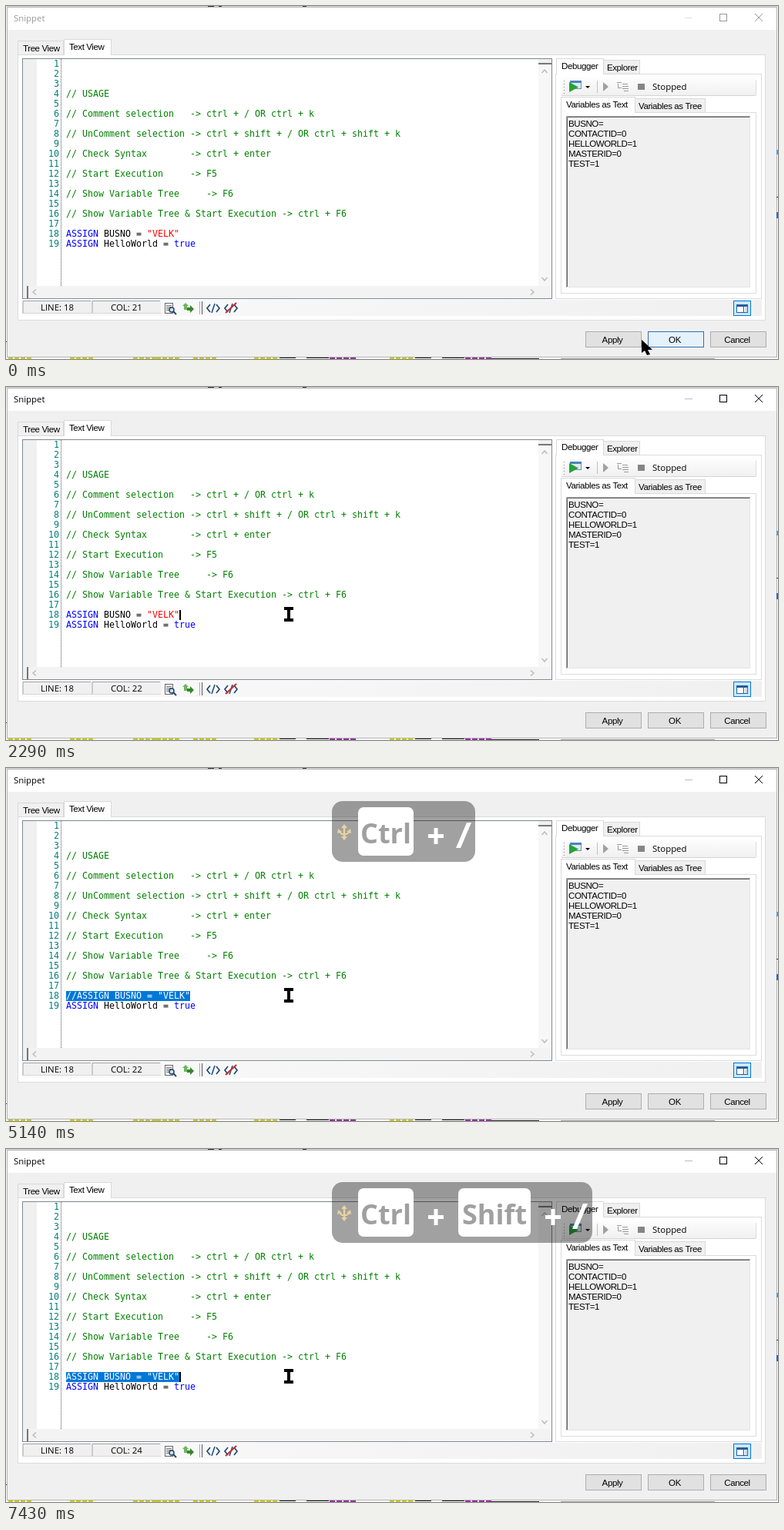
An HTML page with a canvas for the animation above (8000 ms loop, 1002 by 459 pixels).

```html
<!DOCTYPE html>
<html lang="en">
<head>
<meta charset="utf-8">
<title>Snippet editor</title>
<style>
html, body { margin: 0; width: 100%; height: 100%; overflow: hidden; background: #fff; }
canvas { display: block; }
</style>
</head>
<body>
<canvas id="stage" width="1002" height="459"></canvas>
<script>
const g = document.getElementById('stage').getContext('2d');
const LOOP = 8000;
const UI = '11.4px "Open Sans", sans-serif';
const FORM = '11.5px "Liberation Sans", sans-serif';
const CODE = '11.63px "DejaVu Sans Mono", monospace';
const KEY = 'bold 36px "Open Sans", sans-serif';
const GREEN = '#008000', BLUE = '#0000ff', RED = '#ff0000';
const NAME = '"VELK"';

// Pointer positions: time, x, y
const pointer = [
  [0, 825, 434], [140, 734, 410], [290, 624, 386], [430, 490, 349],
  [570, 408, 316], [710, 374, 295], [860, 373, 295], [1000, 361, 286]
];
const caretToggles = [1290, 1710, 2290, 2710, 3290, 4140, 4570, 5140, 5570, 6140, 6710, 7290, 7430];
const usage = {
  4: '// USAGE',
  6: '// Comment selection   -> ctrl + / OR ctrl + k',
  8: '// UnComment selection -> ctrl + shift + / OR ctrl + shift + k',
  10: '// Check Syntax        -> ctrl + enter',
  12: '// Start Execution     -> F5',
  14: '// Show Variable Tree     -> F6',
  16: '// Show Variable Tree & Start Execution -> ctrl + F6'
};

function rect(x, y, w, h, fill, border) {
  if (fill) { g.fillStyle = fill; g.fillRect(x, y, w, h); }
  if (border) {
    g.strokeStyle = border;
    g.lineWidth = 1;
    g.strokeRect(x + .5, y + .5, w - 1, h - 1);
  }
}

function text(str, x, y, font = FORM, color = '#000', align = 'left') {
  g.font = font;
  g.letterSpacing = font === FORM ? '-0.4px' : '0px';
  g.fillStyle = color;
  g.textAlign = align;
  g.fillText(str, x, y);
}

function line(points, color, width = 1) {
  g.beginPath();
  points.forEach(([x, y]) => g.lineTo(x, y));
  g.strokeStyle = color;
  g.lineWidth = width;
  g.stroke();
}

function poly(points, color) {
  g.beginPath();
  points.forEach(([x, y]) => g.lineTo(x, y));
  g.fillStyle = color;
  g.fill();
}

function round(x, y, w, h, r, color) {
  g.beginPath();
  g.roundRect(x, y, w, h, r);
  g.fillStyle = color;
  g.fill();
}

function dots(x, y, end, step, color) {
  for (; y < end; y += step) rect(x, y, 1, 1, color);
}

function gradient(x0, y0, x1, y1, from, to) {
  const fill = g.createLinearGradient(x0, y0, x1, y1);
  fill.addColorStop(0, from);
  fill.addColorStop(1, to);
  return fill;
}

function tab(label, x, y, w, h, active, baseline, inset = 7) {
  rect(x, y, w, h, active ? '#fff' : '#f0f0f0', '#d9d9d9');
  if (active) rect(x + 1, y + h - 1, w - 2, 2, '#fff');
  text(label, x + inset, baseline);
}

// dx, dy give the direction the chevron points in
function chevron(x, y, dx, dy) {
  line([
    [x - 2 * dx - 3.5 * dy, y - 3.5 * dx - 2 * dy],
    [x + 2 * dx, y + 2 * dy],
    [x - 2 * dx + 3.5 * dy, y + 3.5 * dx - 2 * dy]
  ], '#bcbcbc', 1.5);
}

function drawBackdrop() {
  rect(0, 0, 1002, 459, '#fff');
  rect(0, 0, 1002, 1, '#d8d8d8');
  [[262, 8], [276, 4], [385, 5]].forEach(([x, w]) => rect(x, 0, w, 1, '#333'));
  [3, 83, 165, 195, 243, 322, 498].forEach(x => {
    for (let i = 0; i < 32; i += 8) rect(x + i, 457, 6, 2, '#c8c81e');
  });
  [[355, 21], [390, 29], [531, 21], [566, 29]].forEach(([x, w]) => rect(x, 457, w, 1, '#111'));
  [420, 596].forEach(x => { for (let i = 0; i < 36; i += 9) rect(x + i, 457, 7, 2, '#90319a'); });
  rect(630, 458, 62, 1, '#222');
  rect(720, 458, 200, 1, '#999');
  rect(0, 436, 2, 1, '#333');
}

function drawWindow(active) {
  rect(1, 1, 1000, 456, '#f0f0f0', '#b4b4b4');
  rect(2, 2, 998, 29, '#fff');
  rect(1000, 187, 2, 6, '#4d9ddb');
  rect(1000, 268, 2, 8, '#2864c8');
  rect(1000, 248, 2, 1, '#333');
  const ink = active ? '#000' : '#999';
  text('Snippet', 10, 20, UI, ink);
  rect(881, 15, 10, 1, active ? '#bbb' : '#e0e0e0');
  rect(926, 10, 10, 10, null, ink);
  line([[972, 10], [982, 20]], ink);
  line([[982, 10], [972, 20]], ink);

  rect(15, 63, 971, 346, '#fff', '#dcdcdc');
  tab('Tree View', 15, 45, 60, 19, false, 59);
  tab('Text View', 75, 43, 62, 21, true, 57);
}

function drawEditorFrame() {
  rect(21, 68, 688, 313, '#fff', '#828790');
  rect(22, 69, 18, 295, '#f0f0f0');
  dots(71, 69, 364, 2, '#555');
  rect(691, 69, 17, 295, '#f7f7f7');
  rect(691, 69, 17, 7, '#f0f0f0');
  rect(691, 74, 17, 2, '#777');
  rect(22, 364, 686, 16, '#f3f3f3');
  rect(22, 364, 7, 16, '#f0f0f0');
  rect(27, 364, 2, 16, '#777');
  chevron(699, 85, 0, -1);
  chevron(699, 355, 0, 1);
  chevron(37, 372, -1, 0);
  chevron(683, 372, 1, 0);
  for (let n = 1; n <= 19; n++) text(n, 69, 66 + 13 * n, CODE, '#008080', 'right');
}

function drawStatusBar(col) {
  rect(21, 382, 960, 21, gradient(21, 0, 981, 0, '#fafafa', '#f0f0f0'));
  [22, 112].forEach(x => {
    rect(x, 383, 89, 17, '#f0f0f0');
    line([[x, 400], [x, 383.5], [x + 88, 383.5]], '#a0a0a0');
    rect(x, 399, 89, 1, '#d8d8d8');
  });
  text('LINE: 18', 45, 396, UI);
  text('COL: ' + col, 136, 396, UI);

  // Document with magnifier
  rect(206, 386, 11, 14, '#fff', '#666');
  for (let y = 389; y < 397; y += 2) rect(208, y, 7, 1, '#777');
  g.beginPath();
  g.arc(215, 395, 3, 0, 7);
  g.fillStyle = '#cfe3f5';
  g.fill();
  g.strokeStyle = '#25476b';
  g.lineWidth = 1.5;
  g.stroke();
  line([[217, 397], [221, 401]], '#25476b', 2);

  // Green syntax arrows
  poly([[229, 390], [233, 386], [237, 390], [235, 390], [235, 395], [231, 395], [231, 390]], '#6cb55f');
  poly([[235, 392], [239, 392], [239, 389], [244, 394], [239, 399], [239, 396], [235, 396]], '#36862b');

  rect(251, 384, 1, 17, '#aaa');
  rect(254, 384, 1, 17, '#555');
  [261, 284].forEach(x => {
    line([[x + 4, 388], [x, 393], [x + 4, 398]], '#1d4a74', 1.7);
    line([[x + 12, 388], [x + 16, 393], [x + 12, 398]], '#1d4a74', 1.7);
    line([[x + 10, 387], [x + 6, 399]], '#1d4a74', 1.5);
  });
  line([[285, 399], [299, 386]], '#c92d2d', 2);

  rect(944, 383, 23, 20, '#cce8ff', '#0078d7');
  rect(948, 388, 15, 11, '#fff', '#245d9b');
  rect(948, 388, 15, 3, '#245d9b');
  rect(957, 390, 1, 8, '#245d9b');
  dots(960, 392, 398, 2, '#245d9b');
}

function drawDebugger() {
  rect(713, 88, 268, 293, '#fff', '#dcdcdc');
  tab('Explorer', 775, 70, 48, 19, false, 84, 5);
  tab('Debugger', 714, 68, 62, 21, true, 82);

  rect(721, 93, 252, 24, gradient(0, 93, 0, 117, '#fdfdfd', '#f0f0f0'));
  rect(721, 116, 252, 1, '#d5d5d5');
  rect(973, 96, 1, 20, '#ddd');
  dots(724, 97, 114, 4, '#888');
  rect(732, 97, 15, 11, '#dfe9f2', '#7590a8');
  rect(732, 97, 15, 3, '#4b83b8');
  poly([[731, 99], [743, 105.5], [731, 112]], '#26a234');
  poly([[752, 104], [758, 104], [755, 107]], '#000');
  rect(767, 97, 1, 16, '#c0c0c0');
  poly([[775, 99], [782, 105], [775, 111]], '#a0a0a0');
  [[793, 99, 6], [800, 101, 7], [800, 104, 8], [800, 107, 8], [802, 110, 6]].forEach(([x, y, w]) => rect(x, y, w, 1, '#999'));
  line([[794.5, 101], [794.5, 106.5], [799, 106.5]], '#999');
  rect(820, 101, 9, 8, '#858585');
  text('Stopped', 839, 109, UI);

  rect(720, 138, 254, 236, '#fff', '#dcdcdc');
  tab('Variables as Tree', 816, 120, 92, 19, false, 134, 5);
  tab('Variables as Text', 720, 118, 97, 21, true, 132);

  // Sunken text box
  rect(727, 143, 239, 223, '#f0f0f0');
  line([[727.5, 366], [727.5, 143.5], [966, 143.5]], '#a0a0a0');
  line([[728.5, 365], [728.5, 144.5], [965, 144.5]], '#696969');
  line([[728, 365.5], [965.5, 365.5], [965.5, 144]], '#e3e3e3');
  ['BUSNO=', 'CONTACTID=0', 'HELLOWORLD=1', 'MASTERID=0', 'TEST=1']
    .forEach((s, i) => text(s, 730, 157 + 13 * i));
}

function button(label, x, hot) {
  rect(x, 423, 73, 21, hot ? '#e5f1fb' : '#e1e1e1', hot ? '#2f6fb3' : '#adadad');
  text(label, x + 35, 438, FORM, '#000', 'center');
}

function codeRun(parts, n) {
  let x = 78;
  parts.forEach(([s, color]) => {
    text(s, x, 66 + 13 * n, CODE, color);
    x += s.length * 7;
  });
}

function drawCode(t) {
  for (const n in usage) codeRun([[usage[n], GREEN]], +n);
  const commented = t >= 3570 && t < 7430;
  const statement = (commented ? '//' : '') + 'ASSIGN BUSNO = ' + NAME;
  const end = 78 + statement.length * 7;
  if (t >= 3570) {
    rect(78, 290, end - 78, 13, '#0078d7');
    codeRun([[statement, '#fff']], 18);
  } else {
    codeRun([['ASSIGN', BLUE], [' BUSNO = ', '#000'], [NAME, RED]], 18);
  }
  codeRun([['ASSIGN', BLUE], [' HelloWorld = ', '#000'], ['true', BLUE]], 19);
  if (caretToggles.filter(at => at <= t).length % 2) rect(end, 290, 2, 13, '#000');
}

function drawHandle() {
  const color = '#ead2a2';
  line([[439, 76], [439, 91]], color, 2.5);
  line([[433, 83], [436, 86], [442, 86], [446, 83]], color, 2);
  poly([[435, 78], [439, 73], [443, 78]], color);
  poly([[430, 85], [431, 79], [436, 83]], color);
  poly([[448, 85], [447, 79], [442, 83]], color);
  poly([[435, 89], [443, 89], [439, 94]], color);
}

function keyCap(label, x, w) {
  round(x, 51, w, 63, 7, '#fff');
  text(label, x + w / 2, 98, KEY, '#a0a0a0', 'center');
}

function plus(x) {
  rect(x - 10, 86, 20, 5, '#fff');
  rect(x - 2.5, 78, 5, 21, '#fff');
}

function slash(x) {
  poly([[x + 14, 71], [x + 20, 71], [x + 6, 104], [x, 104]], '#fff');
}

function drawKeys(t) {
  const first = t >= 3570 && t < 6570;
  const second = t >= 7430;
  if (first || second) {
    round(423, 43, first ? 186 : 338, 79, 14, 'rgba(0,0,0,.37)');
    keyCap('Ctrl', 457, 72);
    plus(558);
    if (second) {
      keyCap('Shift', 587, 94);
      plus(710);
    }
    slash(first ? 584 : 735);
  }
  if (second || t >= 3570 && t < 6710) drawHandle();
}

function drawPointer(t) {
  const [at, x, y] = pointer.findLast(p => p[0] <= t);
  if (at < 430) {
    poly([[0, 0], [0, 17], [4, 14], [7, 20], [11, 19], [8, 13], [14, 13]].map(([a, b]) => [x + a, y + b]), '#000');
  } else {
    rect(x, y, 12, 4, '#000');
    rect(x + 4, y, 4, 19, '#000');
    rect(x, y + 15, 12, 4, '#000');
  }
}

function draw(now) {
  const t = now % LOOP;
  drawBackdrop();
  drawWindow(t >= 1140);
  drawEditorFrame();
  drawDebugger();
  drawStatusBar(t < 1290 ? 21 : t < 6140 ? 22 : 24);
  button('Apply', 752);
  button('OK', 833, t < 140);
  button('Cancel', 914);
  drawCode(t);
  drawKeys(t);
  drawPointer(t);
}

const start = performance.now();
function tick() {
  draw(performance.now() - start);
  requestAnimationFrame(tick);
}
tick();
</script>
</body>
</html>
```
